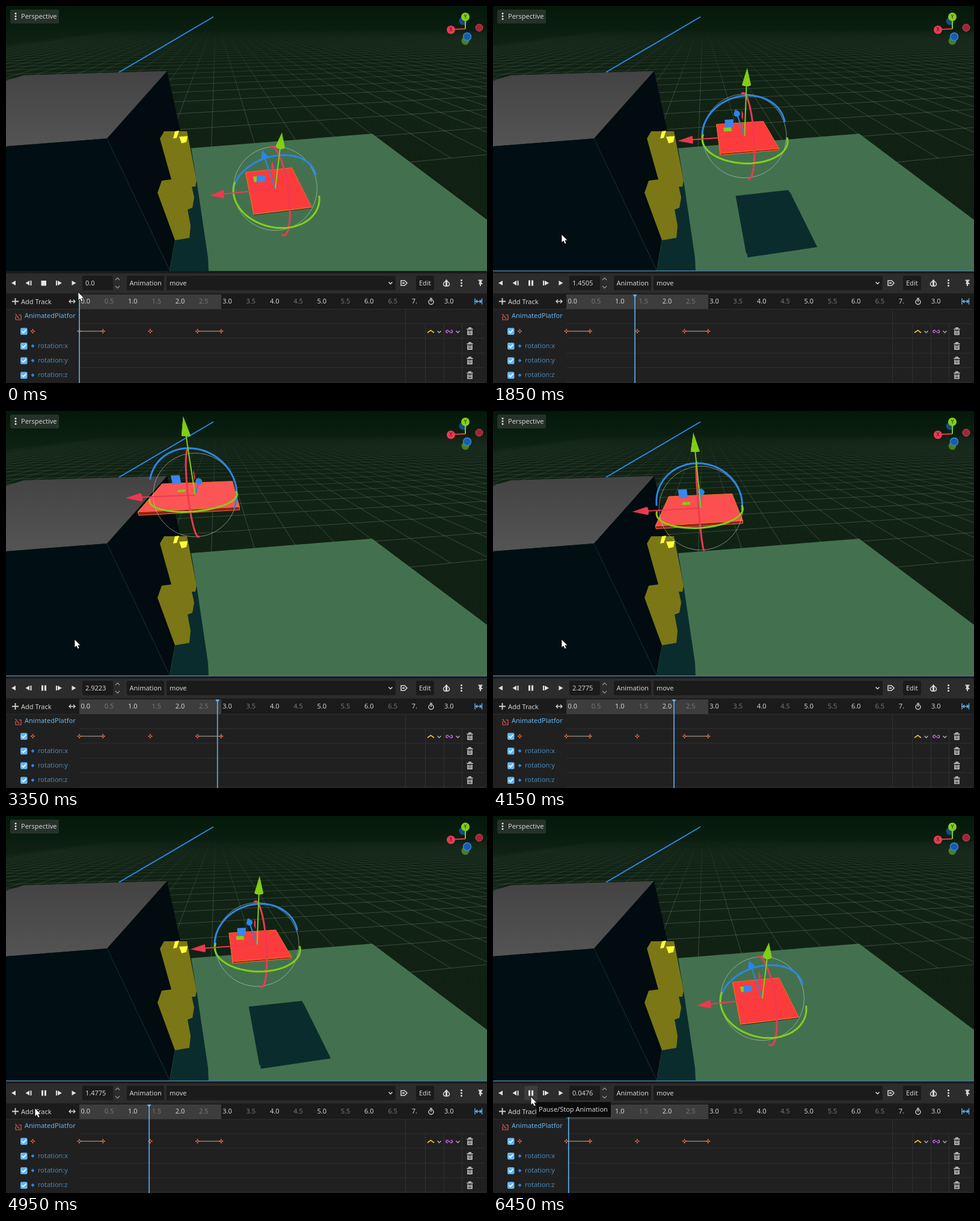
Recreate the animation shown at these times as an HTML page. Size 800x626 px, loop 6500 ms.

```html
<!DOCTYPE html>
<html>
<head>
<meta charset="utf-8">
<style>
html, body { margin: 0; width: 100%; height: 100%; overflow: hidden; background: #202020; }
svg { display: block; width: 800px; height: 626px; }
text { font: 11px "Noto Sans", sans-serif; fill: #d2d2d2; }
</style>
</head>
<body>
<svg id="stage" viewBox="0 0 800 626" xmlns="http://www.w3.org/2000/svg"></svg>
<script>
const LOOP = 6500, STEP = 50, PLAY_AT = 350, TIP_AT = 6100;
const RED = '#ec3a52', GREEN = '#83cf16', BLUE = '#2a86e8', INK = '#d2d2d2', SKY = '#62b5f2';

// Camera space: right, up, forward. World axes as seen by the camera.
const FOCAL = 314;
const X = [-.9909, -.0734, -.1135], Y = [0, .8398, -.5429], Z = [-.1351, .5379, .832];
const dot = (a, b) => a[0] * b[0] + a[1] * b[1] + a[2] * b[2];
const add = (p, v, s) => p.map((c, i) => c + v[i] * s);
const move = (p, x, y, z) => add(add(add(p, X, x), Y, y), Z, z);
const mix = (a, b, u) => a.map((c, i) => c + (b[i] - c) * u);
const project = p => [400 + FOCAL * p[0] / p[2], 220 - FOCAL * p[1] / p[2]];
const coords = ps => ps.map(p => project(p).map(n => n.toFixed(1)).join()).join(' ');

// Markup helpers
const rect = (x, y, w, h, fill, more = '') => `<rect x="${x}" y="${y}" width="${w}" height="${h}" fill="${fill}" ${more}/>`;
const poly = (points, fill, more = '') => `<polygon points="${points}" fill="${fill}" ${more}/>`;
const line = (d, stroke, w = 1, more = '') => `<path d="${d}" stroke="${stroke}" stroke-width="${w}" fill="none" ${more}/>`;
const curve = (ps, stroke, w) => `<polyline points="${coords(ps)}" fill="none" stroke="${stroke}" stroke-width="${w}"/>`;
const disc = (x, y, r, fill, more = '') => `<circle cx="${x}" cy="${y}" r="${r}" fill="${fill}" ${more}/>`;
const label = (x, y, s, fill = INK, more = '') => `<text x="${x}" y="${y}" style="fill:${fill}" ${more}>${s}</text>`;
const dots = (x, y) => [-4.5, 0, 4.5].map(d => disc(x, y + d, 1.5, '#e0e0e0')).join('');
const range = n => [...Array(n).keys()];

function grid() {
  const g = .4, at = (x, z) => move([0, 0, 0], x, -1, z);
  const seg = (a, b) => curve([a, b], 'url(#fade)', 1);
  return range(75).map(i => seg(at(2.128 + (i - 16) * -g, 1), at(2.128 + (i - 16) * -g, 60))).join('') +
    range(60).map(i => seg(at(8, 1 + i * g), at(-30, 1 + i * g))).join('');
}

function scenery() {
  return rect(0, 0, 800, 440, 'url(#sky)') + grid() +
    line('M188 110L345 18', BLUE, 2) +
    poly('296,237 609,212 800,355 800,440 272,440', '#43714f') +
    poly('272,440 303,267 296,237 308,236 317,290 336,418 337,440', '#0b2c2d');
}

function block() {
  return poly('0,124 30,115 268,108 168,220 0,233', 'url(#roof)') +
    poly('0,233 168,220 272,440 0,440', '#010e13') +
    poly('268,108 168,220 272,438 303,267', '#010b10') +
    line('M168 220L272 438', '#18373a', .8) +
    poly('256,220 263,208 301,208 317,290 315,300 309,300 313,318 310,335 302,338 307,365 305,385 281,389 252,310 259,290 275,288', '#7b7716') +
    poly('281,208 288,207 284,219 278,220', '#fdfb3a') +
    poly('288,217 302,216 300,226 292,228', '#fdfb3a');
}

function compass() {
  const mark = (x, y, s) => label(x, y + 3, s, '#1c1c1c', 'text-anchor="middle" font-weight="bold" transform-origin="' + x + ' ' + y + '" transform="scale(.75)"');
  return disc(760, 25, 6.5, '#174a80') + disc(764, 58, 6.5, '#4a8016') +
    line('M764 38V18', GREEN, 2) + line('M764 38L740 39', RED, 2) +
    disc(787, 36, 6, '#98293a', `stroke="${RED}"`) +
    disc(767, 51, 6.5, '#1c5ca6', `stroke="${BLUE}" stroke-width="1.5"`) +
    disc(740, 39.5, 7, RED) + mark(740, 39.5, 'X') + disc(764, 18, 7, GREEN) + mark(764, 18.5, 'Y') +
    rect(7, 6, 81, 23, '#253129', 'rx="2"') + dots(16, 17) + label(25, 21, 'Perspective');
}

const timeX = t => 122.5 + 78.6 * t;

function panel() {
  const tri = (x, w) => poly(`${x},456 ${x},464 ${x + w},460`, '#e0e0e0');
  const key = (x, y) => line(`M${x - 3.5} ${y}h2.5m2 0h2.5M${x} ${y - 3.5}v2.5m0 2v2.5`, '#d8693c', 2);
  const check = y => rect(24, y - 5.5, 11.5, 11.5, SKY, 'rx="2"') + line(`M26.5 ${y}l2.5 2.5l4.5 -5`, '#fff', 1.7);
  const trash = y => line(`M766.5 ${y - 3.5}h10M769 ${y - 5.5}h5`, '#ddd', 1.5) +
    line(`M768 ${y - 1.5}v7h7v-7M770.3 ${y - 1}v5M772.8 ${y - 1}v5`, '#ddd', 1.4);
  const chevron = (x, y, c = '#aaa') => line(`M${x - 3} ${y - 1.5}l3 3l3 -3`, c, 1.5);
  let s = rect(0, 440, 800, 186, '#202020') + rect(0, 440, 800, 4, '#1a1a1a') + rect(0, 444, 800, 33, '#2c2c2c') +
    rect(0, 478, 800, 25, '#1b1b1b') + rect(122, 479, 236, 24, '#3d3d3d');
  s += `<g id="hover"></g>`;
  s += tri(16, -7) + tri(39, -6.5) + rect(40.5, 456, 2, 8, '#e0e0e0') + tri(86, 7) + rect(83, 456, 2, 8, '#e0e0e0') + tri(109.5, 7);
  s += rect(127, 448, 51, 24, '#1b1b1b', 'rx="2"') + line('M182 455l3.5 -3.5l3.5 3.5M182 465l3.5 3.5l3.5 -3.5', '#999', 1.2);
  s += rect(201, 448, 62, 24, '#1b1b1b', 'rx="2"') + label(205.5, 464, 'Animation');
  s += rect(267, 448, 381, 24, '#1b1b1b', 'rx="2"') + label(272, 464, 'move') + chevron(639.5, 460, '#ddd');
  s += line('M657 456h6l4 4l-4 4h-6z', INK, 1.6) + line('M659 460h4', INK, 2);
  s += rect(682, 448, 30, 24, '#1b1b1b', 'rx="2"') + label(687, 464, 'Edit');
  s += line('M732.5 454.5c-1 4 -5 3.5 -5 7c0 5 10 5 10 0c0 -3.5 -4 -3 -5 -7z', INK, 1.5) + line('M732.5 457v8', INK, 3) + dots(757.5, 460);
  s += line('M785.5 455.5h7M786.5 461h6M789 456v9', INK, 2) + rect(787, 455, 4, 6, INK);
  s += line('M10 490.5h11M15.5 485v11', INK, 1.8) + label(25, 494.5, 'Add Track');
  s += line('M105.5 490.5h9M108 487.5l-3 3l3 3M112 487.5l3 3l-3 3', INK, 1.3);
  range(14).forEach(i => s += label(timeX(i / 2) + 2, 494, (i / 2).toFixed(1), i % 2 ? '#777' : INK));
  s += label(674.7, 494, '7.');
  s += disc(707, 491.5, 4, 'none', `stroke="${INK}" stroke-width="1.4"`) + line('M705 485.5h4M707 488.5v3', INK, 1.4) + label(729, 494, '3.0');
  s += line('M780 485.5v10M791.5 485.5v10M782 490.5h8M784 488l-2.5 2.5l2.5 2.5M788 488l2.5 2.5l-2.5 2.5', SKY, 1.4);
  s += line('M0 503.5H797M122 527.5H797M122 551.5H797M122 576.5H797M122 600.5H797M122 624.5H797', '#2e2e2e');
  s += line('M664.5 503V626M697.5 528V626M728.5 528V626M758.5 528V626', '#303030');
  s += line('M16 515v6h9v-8h-4M18 515l4 4M15.5 511.5l3 3', '#dd5b50', 1.2) + label(31, 518, 'AnimatedPlatfor', SKY);
  s += check(540) + key(44.5, 540) + trash(540);
  s += line(`M${timeX(0)} 540H${timeX(.5)}M${timeX(2.5)} 540H${timeX(3)}`, '#8c8078', 1.6);
  [0, .5, 1.5, 2.5, 3].forEach(t => s += key(timeX(t) - .5, 540));
  s += line('M701 542.5l5.5 -4l5.5 4', '#e9bd35', 1.8) + chevron(720.5, 541) + chevron(751.5, 541);
  s += line('M736 538.5h-2.5q-1.5 0 -1.5 2t2 2h1M738.5 542.5h2.5q1.5 0 1.5 -2t-2 -2h-1M735 540.5h4', '#c565e0', 1.6);
  ['x', 'y', 'z'].forEach((axis, i) => {
    const y = 564.5 + 24.3 * i;
    s += check(y) + poly(`41.5,${y} 44.5,${y - 3} 47.5,${y} 44.5,${y + 3}`, '#2f82e0') + label(53, y + 3, 'rotation:' + axis, '#4888b8') + trash(y);
  });
  return s;
}

const stage = document.getElementById('stage');
const stops = list => list.map(([o, c, a = 1]) => `<stop offset="${o}" stop-color="${c}" stop-opacity="${a}"/>`).join('');
const shade = (id, y1, y2, list) =>
  `<linearGradient id="${id}" gradientUnits="userSpaceOnUse" x1="0" x2="0" y1="${y1}" y2="${y2}">${stops(list)}</linearGradient>`;
stage.innerHTML = '<defs>' +
  shade('sky', 0, 440, [[0, '#04190a'], [.14, '#0e2112'], [.35, '#112314'], [1, '#101f12']]) +
  shade('fade', 40, 220, [[0, '#8c908c', 0], [.2, '#8c908c', .12], [.6, '#8c908c', .32], [1, '#8c908c', .36]]) +
  shade('roof', 108, 233, [[0, '#434343'], [1, '#545454']]) +
  '<clipPath id="view"><rect width="800" height="440"/></clipPath></defs>' +
  `<g clip-path="url(#view)">${scenery()}<g id="shadow"></g>${block()}<g id="platform"></g><g id="gizmo"></g>${compass()}</g>` +
  panel() + '<g id="overlay"></g>';
const layer = id => document.getElementById(id);
const [hover, shadow, platform, gizmo, overlay] = ['hover', 'shadow', 'platform', 'gizmo', 'overlay'].map(layer);

// Piecewise linear track: rows of [time, ...values]
function sample(track, t) {
  const i = track.findIndex(row => row[0] > t);
  if (i < 0) return track[track.length - 1].slice(1);
  if (i === 0) return track[0].slice(1);
  const a = track[i - 1], b = track[i];
  return mix(a, b, (t - a[0]) / (b[0] - a[0])).slice(1);
}
const playback = [[410, 0], [1200, .7804], [2500, 2.1205], [3350, 2.9223], [3427.5, 3],
  [4150, 2.2775], [4950, 1.4775], [6404, 0], [6450, .0476]];
const path = [[.5, 1.529, -2.611, 10], [1.5, .54, .321, 10], [2.5, -1.78, 1.718, 6.5]];
const pointer = [[0, 120, 475], [200, 114, 456], [450, 114, 456], [900, 114, 379], [4600, 114, 379],
  [4950, 48, 485], [5350, 48, 485], [5700, 63, 466]];

const FLOOR = -7.65, HALF = 1.4, THICK = .1, LIGHT = [.483, -1.609, -.647];

function drawPlatform(p) {
  const height = dot(p, Y) - FLOOR, thick = Math.min(THICK, height);
  const corners = y => [[1, 1], [-1, 1], [-1, -1], [1, -1]].map(([x, z]) => move(p, x * HALF, y, z * HALF));
  const top = corners(0), base = corners(-thick);
  const edge = 'stroke="#f2701f" stroke-width="1" stroke-linejoin="round"';
  const cast = (ps, h) => poly(coords(ps.map(c => add(c, LIGHT, h))), '#0b2c2d');
  // The top catches more light as it nears the camera.
  const glow = 60 + 7 * (10 - p[2]);
  shadow.innerHTML = cast(top, height) + cast(base, height - thick);
  platform.innerHTML =
    poly(coords([top[0], top[3], base[3], base[0]]), '#8a1c1a', edge) +
    poly(coords([top[3], top[2], base[2], base[3]]), '#8f211c', edge) +
    poly(coords(top), `rgb(252,${glow},${glow})`, edge);
}

function drawGizmo(p) {
  const d = p[2], [cx, cy] = project(p);
  const ring = (u, v, color) => {
    const mid = Math.atan2(dot(v, p), dot(u, p)) + Math.PI;
    return curve(range(41).map(i => {
      const a = mid + (i / 40 - .5) * Math.PI;
      return add(add(p, u, .222 * d * Math.cos(a)), v, .222 * d * Math.sin(a));
    }), color, 3);
  };
  const handle = (u, v, color) => poly(coords([[.06, .06], [.103, .06], [.103, .103], [.06, .103]]
    .map(([a, b]) => add(add(p, u, a * d), v, b * d))), color);
  const arrow = (axis, u, v, color) => {
    const tip = add(p, axis, .345 * d), neck = add(p, axis, .272 * d);
    const rim = range(17).map(i => add(add(neck, u, .02 * d * Math.cos(i * Math.PI / 8)), v, .02 * d * Math.sin(i * Math.PI / 8)));
    return curve([p, neck], color, 2) + poly(coords(rim), color) +
      range(16).map(i => poly(coords([tip, rim[i], rim[i + 1]]), color)).join('');
  };
  gizmo.innerHTML = disc(cx, cy, 69.5, 'none', 'stroke="#c8d0c8" stroke-opacity=".6"') +
    ring(Y, Z, RED) + ring(X, Y, BLUE) + ring(X, Z, GREEN) +
    handle(Y, Z, RED) + handle(X, Z, GREEN) + handle(X, Y, '#3b86ea') +
    arrow(Z, X, Y, BLUE) + arrow(X, Y, Z, RED) + arrow(Y, X, Z, GREEN);
}

function drawPanel(t, time) {
  const playing = t >= PLAY_AT, [mx, my] = sample(pointer, t), x = timeX(time) - .5;
  const over = (l, top, w, h) => mx >= l && mx < l + w && my >= top && my < top + h;
  hover.innerHTML = [[52, 448, 22, 24], [102, 448, 22, 24], [6, 479, 72, 23]]
    .filter((b, i) => i === 2 ? t > 4950 && over(...b) : over(...b))
    .map(b => rect(...b, '#3d3d3d', 'rx="2"')).join('');
  let s = playing
    ? rect(59, 455.5, 3, 9, '#e6e6e6') + rect(64, 455.5, 3, 9, '#e6e6e6') + rect(0, 439, 800, 1.6, '#46799a')
    : rect(58.5, 456, 8.5, 8.5, '#e6e6e6');
  s += label(132, 464, playing ? time.toFixed(4) : '0.0');
  s += rect(x - .8, 480, 1.6, 146, SKY) + poly(`${x - 3.5},479 ${x + 3.5},479 ${x},484`, SKY);
  if (t >= TIP_AT) s += rect(72, 475, 124, 25, '#0b0b0b') + label(76, 491, 'Pause/Stop Animation');
  s += `<path transform="translate(${mx} ${my})" d="M0 0V14L3.2 11.2L5.4 16L8 14.8L5.9 10.2H10Z" fill="#fff" stroke="#111" stroke-width=".9"/>`;
  overlay.innerHTML = s;
}

function render(ms) {
  const t = Math.floor((ms % LOOP) / STEP) * STEP;
  const [time] = sample(playback, t), p = sample(path, time);
  drawPlatform(p);
  drawGizmo(move(p, 0, -THICK / 2, 0));
  drawPanel(t, time);
}

const start = performance.now();
function tick() {
  render(performance.now() - start);
  requestAnimationFrame(tick);
}
tick();
</script>
</body>
</html>
```
